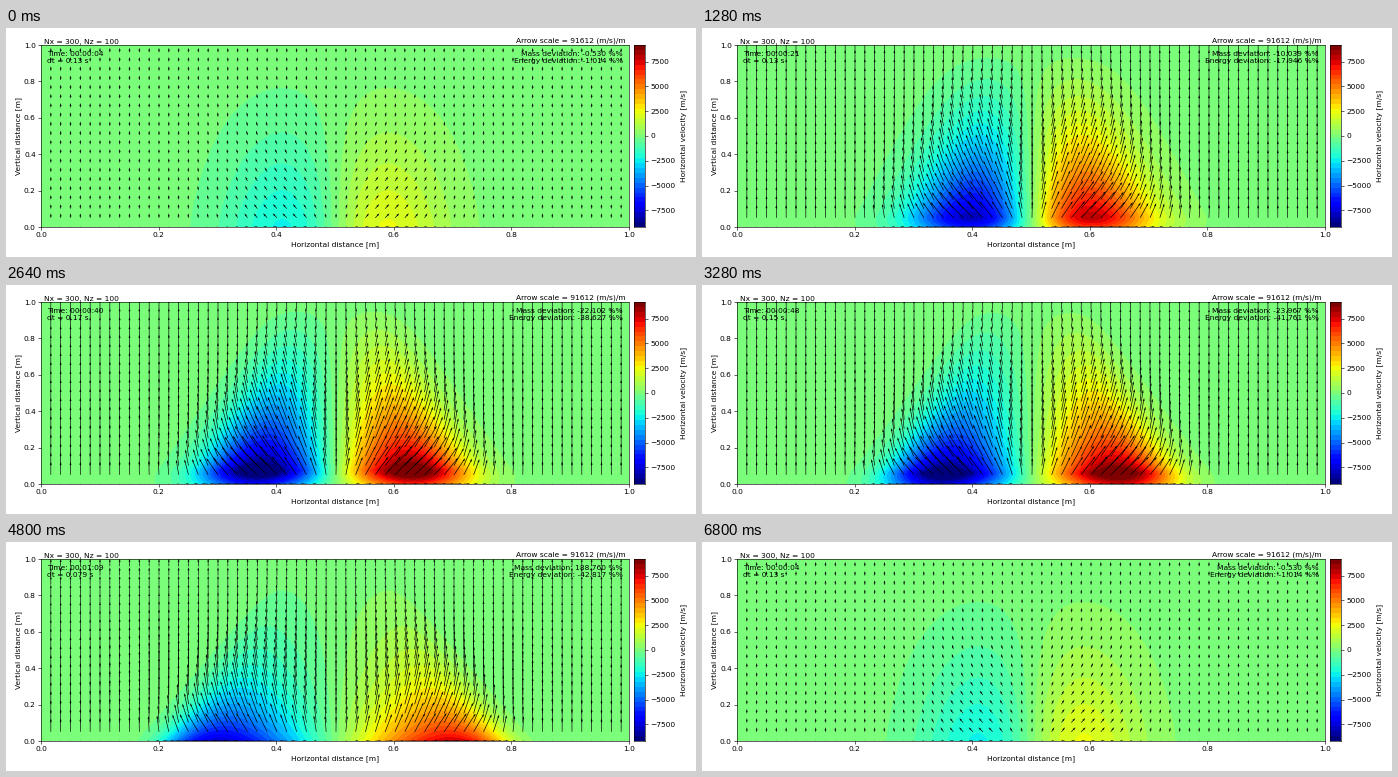
A matplotlib script that plays this animation: 690x229 px, repeating every 6880 ms.

```python
import numpy as np
import matplotlib.pyplot as plt
from matplotlib.animation import FuncAnimation

W, H, DPI = 690, 229, 64
FRAMES, STEP = 86, 80
VMAX = 9161.2
PT = 72 / DPI  # points per pixel

plt.rcParams.update({
    "font.family": "DejaVu Sans", "font.size": 7.45 * PT,
    "axes.linewidth": 0.6 * PT,
    "xtick.major.width": 0.6 * PT, "ytick.major.width": 0.6 * PT,
    "xtick.major.size": 2.6 * PT, "ytick.major.size": 2.6 * PT,
    "xtick.major.pad": 2.6 * PT, "ytick.major.pad": 2.6 * PT,
})

# Key readings of the text fields
KEYS = [0, 9, 23, 33, 49, 73]
DT = [.13, .013, .24, .17, .12, .03]
MASS = [-.53, -4.518, -15.56, -22.12, -26.4, -20.275]
ENERGY = [-1.014, -8.391, -27.501, -38.627, -44.895, -40.361]


def burst(n):
    """Numerical blow-up at the ground, doubling every two steps."""
    return min(2 ** ((n - 73) / 2), 4)


def horizontal(x, z, n):
    """Outflow on both sides of the middle that spreads and sinks."""
    t, swell = n / 73, np.sin(np.pi * n / FRAMES)
    amp = 2300 + 7800 * np.sin(np.pi * (n / FRAMES) ** .8)
    dist = .09 + .145 * t ** 1.5 - .16 * t * z
    fall = 2 + 6 * t ** 2
    core = .08 * np.sin(np.pi * min(n / 60, 1))

    ratio = np.abs(x - .5) / dist
    across = ratio * np.exp((1 - ratio ** fall) / fall)
    dz = z - core
    above = np.exp(-(np.maximum(dz, 0) / (.5 - .27 * t)) ** (1.4 - .55 * swell))
    below = np.exp(-(np.minimum(dz, 0) / .12) ** 2)
    return amp * np.sign(x - .5) * across * above * below * (1 - z ** 4)


def add_burst(u, x, z, n):
    level = 5000 * min(burst(n), 1.2)
    if level < 1500:
        return
    for centre in (.4626, .541):
        off = x - centre
        spot = (np.abs(off) < .008) & (z < .024)
        u[spot] = level * np.sign(off[spot])


def vertical(x, z, n):
    """Arrow heights in pixels: an even rise plus the plume."""
    t = n / 73
    base = (13 - 8.5 * np.exp(-n / 4)) * (1 - .55 * t * z ** 2)
    r = np.abs(x - .5) - .2 * t
    plume = 12 * (1 - np.exp(-n / 15)) * np.exp(-(r / .18) ** 2 - ((z - .3) / .3) ** 2)
    return np.where(z > 0, base + plume, 0)


fig = plt.figure(figsize=(W / DPI, H / DPI), dpi=DPI, facecolor="white")


def panel(x, y, w, h):
    return fig.add_axes([x / W, 1 - (y + h) / H, w / W, h / H])


def label(x, y, text="", ha="left", rotation=0):
    return fig.text(x / W, 1 - y / H, text, ha=ha, va="baseline",
                    rotation=rotation, rotation_mode="anchor")


jet = plt.get_cmap("jet", 37)
ax = panel(35, 17, 588, 182)
px, pz = np.meshgrid((np.arange(588) + .5) / 588, (np.arange(182) + .5) / 182)
image = ax.imshow(np.zeros_like(px), cmap=jet, vmin=-VMAX, vmax=VMAX,
                  extent=(0, 1, 0, 1), origin="lower", aspect="auto",
                  interpolation="nearest")

qx, qz = np.meshgrid(np.arange(5, 300, 5) / 299, np.arange(0, 100, 5) / 99)
arrows = ax.quiver(qx, qz, np.zeros_like(qx), np.ones_like(qx), color="black",
                   units="dots", width=.65, scale_units="dots", scale=1)
ax.set(xlim=(0, 1), ylim=(0, 1), xticks=np.arange(6) / 5, yticks=np.arange(6) / 5)

bar = panel(628, 17, 11, 182)
bar.imshow(np.linspace(-VMAX, VMAX, 37)[:, None], cmap=jet, origin="lower",
           extent=(0, 1, -VMAX, VMAX), aspect="auto", interpolation="nearest")
bar.yaxis.tick_right()
bar.set(xticks=[], yticks=np.arange(-7500, 7501, 2500))

label(329, 218, "Horizontal distance [m]", "center")
label(14, 108, "Vertical distance [m]", "center", 90)
label(679, 108, "Horizontal velocity [m/s]", "center", 90)
label(38, 16.2, "Nx = 300, Nz = 100")
label(619.5, 14.2, "Arrow scale = 91612 (m/s)/m", "right")
clock = label(41, 28.2)
step = label(41, 35.4)
mass = label(617, 28.2, ha="right")
energy = label(617, 35.4, ha="right")


def update(k):
    n = k % (FRAMES - 1)
    u = horizontal(px, pz, n)
    add_burst(u, px, pz, n)
    image.set_data(np.clip(u, -VMAX, VMAX))
    arrows.set_UVC(horizontal(qx, qz, n) / 500, vertical(qx, qz, n))

    sec = int(4 + 1.105 * n - .00032 * n ** 2)
    clock.set_text(f"Time: {sec // 3600:02d}:{sec // 60 % 60:02d}:{sec % 60:02d}")
    step.set_text(f"dt = {np.interp(n, KEYS, DT):.2g} s")
    loss = np.interp(n, KEYS, MASS) + 19220 * burst(n)
    mass.set_text(f"Mass deviation: {loss:.3f} %%")
    energy.set_text(f"Energy deviation: {np.interp(n, KEYS, ENERGY):.3f} %%")
    return image, arrows, clock, step, mass, energy


anim = FuncAnimation(fig, update, frames=FRAMES, interval=STEP,
                     init_func=lambda: update(0), repeat=True, repeat_delay=0)
plt.show()
```
